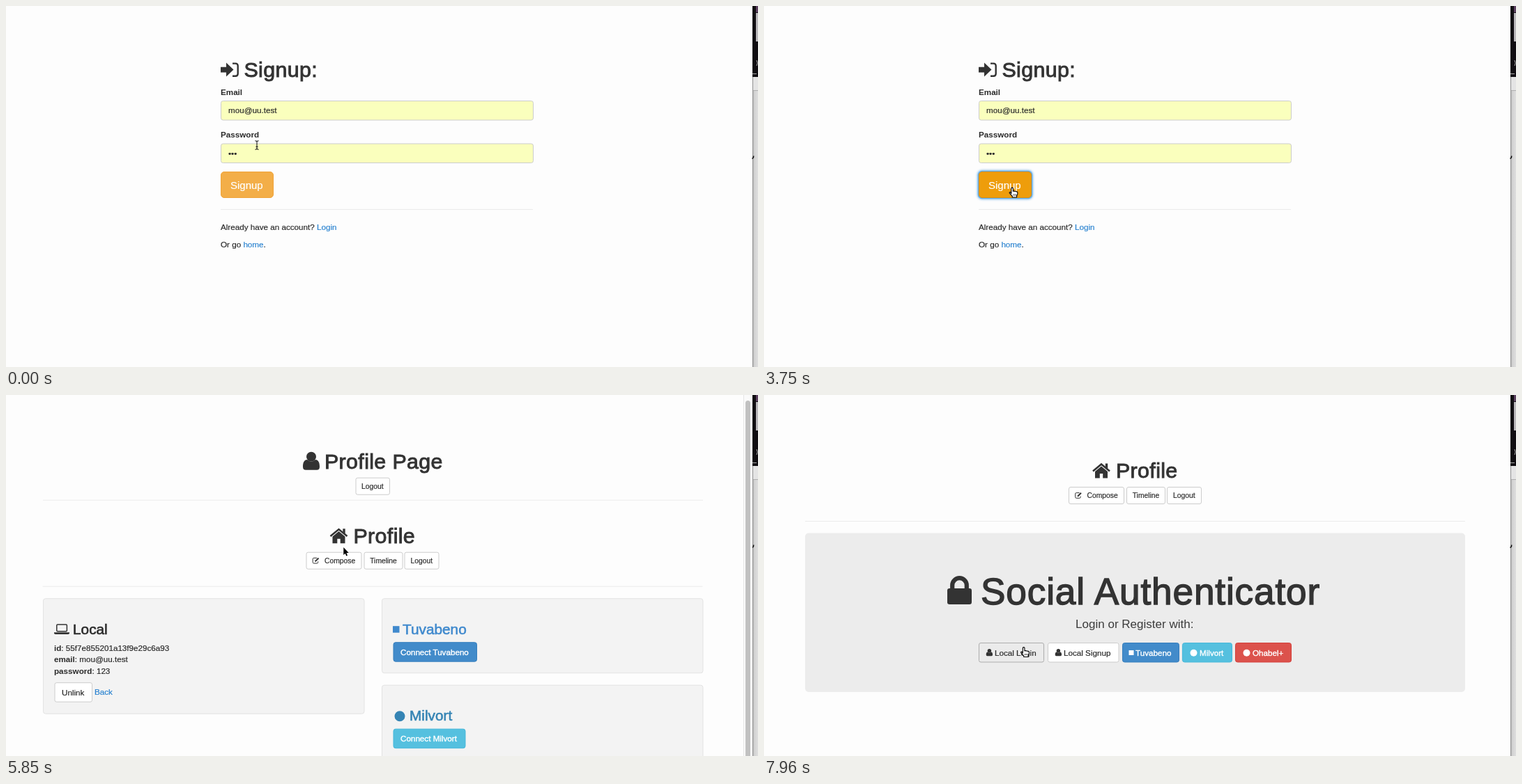
Recreate the animation shown at these times as an HTML page. Size 1079x519 px, loop 8000 ms.

```html
<!DOCTYPE html>
<html lang="en">
<head>
<meta charset="utf-8">
<title>Signup flow</title>
<style>
  html, body { margin: 0; width: 100%; height: 100%; overflow: hidden; background: #fdfdfd; }
  svg { display: block; width: 1079px; height: 519px; }
  text { font: 11.67px "Liberation Sans", Arial, sans-serif; fill: #2b2b2b; stroke: #2b2b2b; stroke-width: .2px; white-space: pre; }
  .h1 { font-size: 30.4px; letter-spacing: .35px; fill: #333; stroke: #333; stroke-width: .95px; }
  .h3 { font-size: 20.8px; stroke-width: .6px; }
  .hero { font-size: 53.2px; letter-spacing: .85px; fill: #333; stroke: #333; stroke-width: 1.4px; }
  .lead { font-size: 17.04px; fill: #3c3c3c; stroke: none; }
  .sm { font-size: 10.3px; }
  .big { font-size: 15px; fill: #fff; stroke: #fff; }
  .on { fill: #fff; stroke: #fff; stroke-width: .4px; }
  .b { font-weight: bold; stroke: none; }
  .a { fill: #2a83d0; stroke: #2a83d0; }
  .hr { stroke: #ebebeb; }
  .btn { fill: #fff; stroke: #ccc; }
  .btn.hover { fill: #ebebeb; stroke: #adadad; }
  .field { fill: #faffbd; stroke: #ccc; }
  .panel { fill: #f3f3f3; stroke: #e3e3e3; }
</style>
</head>
<body>
<svg id="stage" viewBox="0 0 1079 519" xmlns="http://www.w3.org/2000/svg"></svg>
<script>
const LOOP = 8000;
const stage = document.getElementById('stage');

// Markup helpers
const text = (x, y, s, cls = '', extra = '') => `<text x="${x}" y="${y}" class="${cls}" ${extra}>${s}</text>`;
const box = (x, y, w, h, r, attrs) => `<rect x="${x}" y="${y}" width="${w}" height="${h}" rx="${r}" ${attrs}/>`;
const rule = (x1, x2, y) => `<path class="hr" d="M${x1} ${y}H${x2}"/>`;
const use = (id, x, y, k = 1) => `<use href="#${id}" transform="translate(${x} ${y}) scale(${k})"/>`;
const group = (id, body) => `<g id="${id}">${body}</g>`;
const dot = (x, y, r, fill) => `<circle cx="${x}" cy="${y}" r="${r}" fill="${fill}"/>`;
const button = (x, y, w, h, id = '') => box(x + .5, y + .5, w - 1, h - 1, 2.5, `class="btn" ${id && `id="${id}"`}`);
const solid = (x, y, w, h, fill, edge) => box(x + .5, y + .5, w - 1, h - 1, 3, `fill="${fill}" stroke="${edge}"`);
const tint = color => `style="fill:${color};stroke:${color}"`;

const defs = `<defs>
  <filter id="glow" x="-20%" y="-60%" width="140%" height="220%"><feGaussianBlur stdDeviation="1.8"/></filter>
  <linearGradient id="shade"><stop offset="0" stop-color="#a9a9a9"/><stop offset=".35" stop-color="#d2d2d2"/><stop offset="1" stop-color="#dedede"/></linearGradient>
  <g id="user" fill="#333"><circle cx="12" cy="7" r="7"/>
    <path d="M0 21.5C0 15.5 1.8 11.6 6 11.4Q12 16.6 18 11.4C22.2 11.6 24 15.5 24 21.5Q24 26 19.8 26H4.2Q0 26 0 21.5Z"/></g>
  <g id="house" fill="#333"><path d="M1 12.4L13 2.4 25 12.4" fill="none" stroke="#333" stroke-width="2.6"/>
    <path d="M4 12.9L13 5.4 22 12.9V22.6H15.2V16H10.8V22.6H4Z"/><path d="M18.8 1.6H22.2V9L18.8 6Z"/></g>
  <g id="edit" fill="none" stroke="#333"><path d="M6.6 1.3H2.3Q.7 1.3.7 2.8V7.4Q.7 9 2.3 9H6.7Q8.2 9 8.2 7.4V6.2" stroke-width="1"/>
    <path d="M4 6.4L9 1.5" stroke-width="2"/></g>
  <g id="arrow"><path d="M.3 .5V11.6L2.7 9.3 4.3 13 6 12.3 4.5 8.6H7.8Z" stroke="#fff" stroke-width=".9" paint-order="stroke"/></g>
  <g id="hand" stroke="#000" stroke-linejoin="round"><path d="M-3.2 1.8V-5.6a1.3 1.3 0 0 1 2.6 0V-1.6q1-1 2.2.2q1.2-.8 2.2.4q1.8-.5 2 1.2V2.5L4.6 5V7H-1.8V5.4L-5.6 1.2q-.8-1.6.8-1.6q1 .3 1.6 2.2Z" fill="#fff" stroke-width="1.1"/>
    <path d="M-.1 2.4V4.8M1.7 2.4V4.8M3.5 2.4V4.8" stroke-width=".7"/></g>
  <g id="beam" fill="none" stroke="#222" stroke-width="1.1"><path d="M-2.6-6.2Q0-6.2 0-4.4V4.4Q0 6.2-2.6 6.2M2.6-6.2Q0-6.2 0-4.4M0 4.4Q0 6.2 2.6 6.2M-1.5 2.4H1.5"/></g>
</defs>`;

const desktop = `
  <rect width="1079" height="519" fill="#fdfdfd"/>
  <rect x="1071" width="8" height="102" fill="#100d11"/>
  <rect x="1076" width="3" height="9" fill="#5c4160"/>
  <rect x="1076" y="10" width="3" height="41" fill="#b9b7ba"/>
  <path d="M1077 78Q1079.5 82 1077 86M1071 97.5H1077" stroke="#aaa" fill="none"/>
  <rect x="1071" y="102" width="8" height="417" fill="url(#shade)"/>
  <rect x="1072" y="102" width="7" height="19" fill="#e4e4e4"/>
  <path d="M1071 121.5H1079" stroke="#b0b0b0"/>
  <path d="M1071.5 102V519" stroke="#777" stroke-opacity=".55"/>
  <path d="M1070.5 219.5Q1073 218.5 1072.5 215.5" stroke="#111" stroke-width="1.6" fill="none"/>`;

const ring = (id, x, y, w, h, r, line) => group(id,
  box(x, y, w, h, r, 'fill="none" stroke="#66afe9" stroke-width="4" opacity=".75" filter="url(#glow)"') +
  box(x, y, w, h, r, `fill="none" stroke="#66afe9" stroke-width="${line}"`));

const signup = group('signup', `
  <path d="M308 87.7H316V81.5L326.5 91.5 316 101.5V95.6H308Z" fill="#333"/>
  <path d="M325 82.6H329.2Q332.7 82.6 332.7 86.1V97.3Q332.7 100.8 329.2 100.8H325" fill="none" stroke="#333" stroke-width="2.4"/>` +
  text(341.5, 102, 'Signup:', 'h1') +
  text(308, 128, 'Email', 'b') +
  box(308.5, 136.5, 448, 27.5, 3, 'class="field"') +
  text(319, 154, 'mou@uu.test') +
  text(308, 189, 'Password', 'b') +
  ring('fieldRing', 308.5, 198, 448, 27.5, 3, 1) +
  box(308.5, 198, 448, 27.5, 3, 'class="field" id="pass"') +
  text(319, 215.7, '•••') +
  '<path id="caret" d="M331.5 205V218" stroke="#000"/>' +
  ring('btnRing', 307.8, 237.8, 76.4, 38.4, 5, 2.2) +
  box(308.5, 238.5, 75, 37, 4.5, 'id="go"') +
  text(322, 262.7, 'Signup', 'big') +
  rule(308, 756, 292.5) +
  text(308, 322, 'Already have an account? <tspan class="a">Login</tspan>') +
  text(308, 347, 'Or go <tspan class="a">home</tspan>.'));

const nav = prefix =>
  use('house', 471, 97) +
  text(505, 119, 'Profile', 'h1') +
  button(437, 132, 80, 25) + use('edit', 446, 139.3) + text(463.6, 148, 'Compose', 'sm') +
  button(520, 132, 56, 25, prefix + 'Timeline') + text(528.7, 148, 'Timeline', 'sm') +
  button(578, 132, 50, 25) + text(587, 148, 'Logout', 'sm') +
  rule(59, 1006, 181.5);

const profile = group('profile', group('sheet',
  use('user', 426, 95) +
  text(457, 119, 'Profile Page', 'h1') +
  button(501.5, 132, 49.5, 25, 'logout') + text(510, 148, 'Logout', 'sm') +
  rule(53, 1000, 164.5) +
  `<g transform="translate(-6.5 107)">${nav('in')}</g>` +
  box(53.5, 306, 460.5, 165.5, 3.3, 'class="panel"') +
  box(72.8, 343.3, 14.6, 9.8, 1.2, 'fill="none" stroke="#333" stroke-width="1.5"') +
  '<path d="M69 354.6H91V355.6Q91 357.2 89 357.2H71Q69 357.2 69 355.6Z" fill="#333"/>' +
  text(96, 357, 'Local', 'h3') +
  text(69, 381, '<tspan class="b">id</tspan>: 55f7e855201a13f9e29c6a93') +
  text(69, 397.7, '<tspan class="b">email</tspan>: mou@uu.test') +
  text(69, 414.3, '<tspan class="b">password</tspan>: 123') +
  button(69.5, 426.5, 54.5, 28.5) + text(80, 445, 'Unlink') + text(127, 444, 'Back', 'a') +
  box(539.5, 306, 460.5, 107, 3.3, 'class="panel"') +
  box(555, 345.5, 9.5, 9.5, 0, 'fill="#3f89cd"') +
  text(569, 357, 'Tuvabeno', 'h3', tint('#3f89cd')) +
  solid(555.5, 368.5, 120.5, 28.5, '#428bca', '#357ebd') +
  text(566, 387, 'Connect Tuvabeno', 'on') +
  box(539.5, 430.5, 460.5, 140, 3.3, 'class="panel"') +
  dot(565, 475, 7.5, '#3584b4') +
  text(579, 481.7, 'Milvort', 'h3', tint('#3584b4')) +
  solid(555.5, 493, 104, 28.5, '#55c0df', '#46b8da') +
  text(566, 511.5, 'Connect Milvort', 'on')) +
  '<rect x="1058" width="13" height="519" fill="#fafafa"/><path d="M1058.5 0V519" stroke="#e6e6e6"/>' +
  box(1061, 0, 7, 524, 3.5, 'fill="#c1c1c1" id="thumb"'));

const home = group('home', nav('out') +
  box(59, 198.5, 947, 228.5, 5, 'fill="#ececec"') +
  box(263, 278, 35, 23, 3.2, 'fill="#333"') +
  '<path d="M270.2 279V273.5A10.3 10.3 0 0 1 290.8 273.5V279" fill="none" stroke="#333" stroke-width="6.2"/>' +
  text(311, 301, 'Social Authenticator', 'hero') +
  text(447, 335.3, 'Login or Register with:', 'lead') +
  button(308, 356, 94, 28.5, 'local') + use('user', 318.7, 365, .39) + text(331, 374.5, 'Local Login') +
  button(407, 356, 102.5, 28.5) + use('user', 417.7, 365, .39) + text(430, 374.5, 'Local Signup') +
  solid(514, 356, 82, 28.5, '#428bca', '#357ebd') +
  box(523.5, 367, 7, 7, 0, 'fill="#fff"') + text(533, 374.5, 'Tuvabeno', 'on') +
  solid(600, 356, 72, 28.5, '#55c0df', '#46b8da') +
  dot(616.5, 370.7, 5, '#fff') + text(625, 374.5, 'Milvort', 'on') +
  solid(676, 356, 81, 28.5, '#dc524c', '#d43f3a') +
  dot(692.5, 370.7, 5, '#fff') + text(701, 374.5, 'Ohabel+', 'on'));

stage.innerHTML = defs + desktop + signup + profile + home + '<use id="cursor"/>';

// Pointer path: time, x, y, shape; each pose holds until the next
const path = [
  [0, 360, 200, 'beam'], [150, 360, 205, 'beam'], [300, 360, 217, 'beam'], [450, 359, 226, 'arrow'],
  [600, 361, 250, 'hand'], [750, 361, 262, 'hand'], [900, 361, 266, 'hand'], [1050, 361, 256, 'hand'],
  [1200, 360, 213, 'beam'], [2400, 361, 252, 'hand'], [2550, 361, 265, 'hand'], [2700, 360, 267, 'hand'],
  [2850, 358, 268, 'hand'], [4650, 388, 279, 'arrow'], [4800, 410, 290, 'arrow'],
  [5400, 416, 284, 'arrow'], [5550, 434, 268, 'arrow'], [5700, 458, 245, 'arrow'], [5850, 484, 218.5, 'arrow'],
  [6000, 506, 190, 'arrow'], [6150, 524, 163, 'arrow'], [6320, 532, 148, 'hand'],
  [6920, 527, 152, 'hand'], [7070, 409, 248, 'arrow'], [7370, 386, 324, 'arrow'],
  [7670, 378, 346, 'arrow'], [7820, 375, 366, 'hand'], [7960, 374.5, 369.5, 'hand']
];
const scrolls = [[0, 0], [5400, 6], [5550, 18], [5700, 17], [5850, 13.3], [6000, 5], [6150, 0]];

const held = (list, t) => list.filter(k => k[0] <= t).pop();
const within = (t, ...spans) => spans.some(([a, b]) => t >= a && t < b);
const $ = id => document.getElementById(id);
const show = (id, on) => $(id).setAttribute('display', on ? 'inline' : 'none');
const hover = (id, on) => $(id).classList.toggle('hover', on);

function draw(t) {
  show('signup', t < 3900);
  show('profile', within(t, [3900, 6620]));
  show('home', t >= 6620);

  const focus = within(t, [1200, 3450]);
  show('fieldRing', focus);
  $('pass').style.stroke = focus ? '#66afe9' : '#ccc';
  show('caret', within(t, [1200, 1650], [2100, 2700], [3150, 3450]));
  show('btnRing', within(t, [3450, 3900]));
  const hot = within(t, [600, 1200], [2400, 3900]);
  $('go').setAttribute('fill', hot ? '#ee9d0b' : '#f3ae48');
  $('go').setAttribute('stroke', hot ? '#d98f12' : '#f0a43a');

  const scroll = held(scrolls, t)[1];
  $('sheet').setAttribute('transform', `translate(0 ${-scroll})`);
  $('thumb').setAttribute('y', scroll * .6);
  hover('logout', within(t, [6320, 6620]));
  hover('outTimeline', within(t, [6920, 7070]));
  hover('local', t >= 7820);

  const [, x, y, shape] = held(path, t);
  $('cursor').setAttribute('href', '#' + shape);
  $('cursor').setAttribute('transform', `translate(${x} ${y})`);
}

const start = performance.now();
function tick() {
  draw((performance.now() - start) % LOOP);
  requestAnimationFrame(tick);
}
draw(0);
requestAnimationFrame(tick);
</script>
</body>
</html>
```
